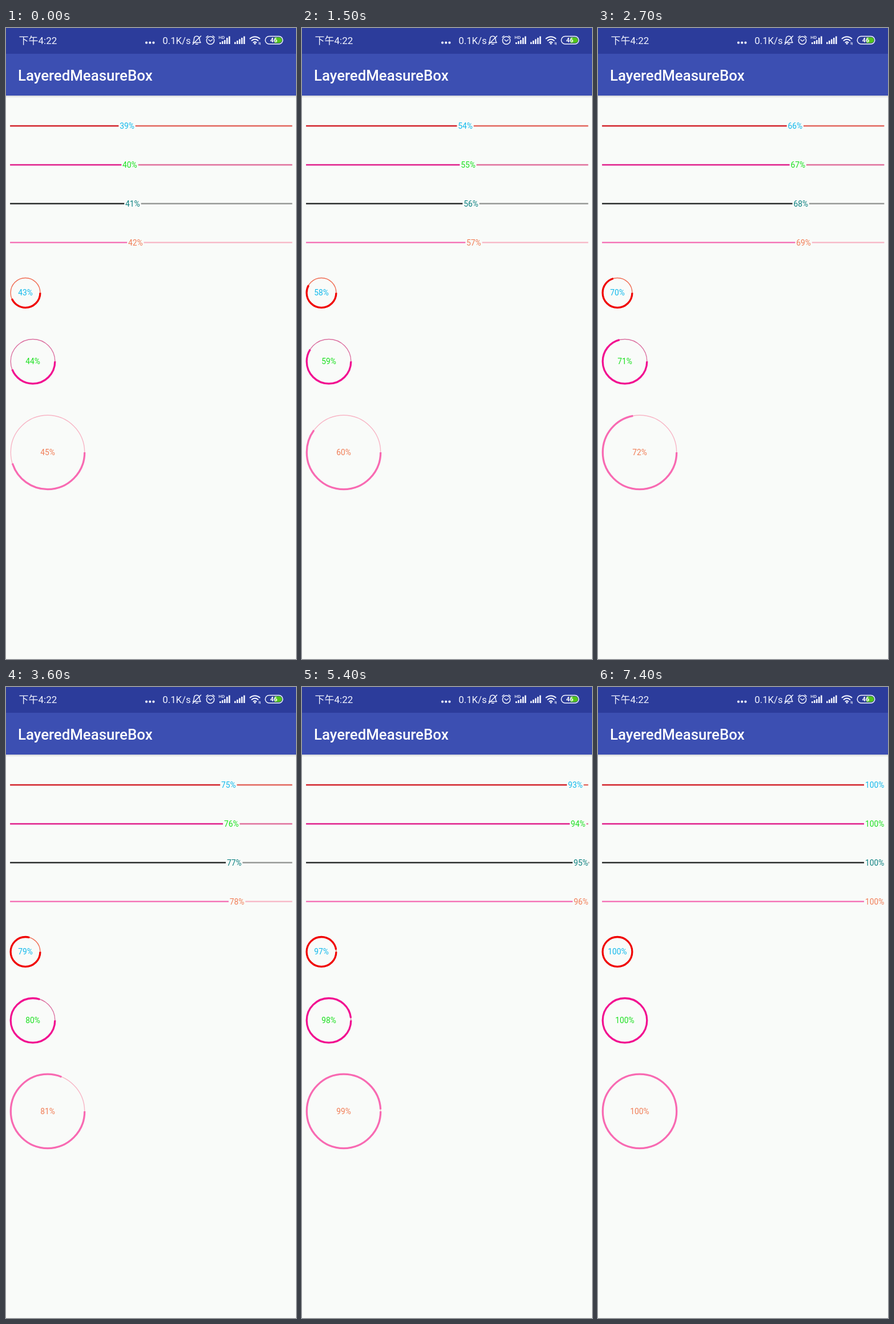
Write an HTML page that moves like this. It is 508 px wide and 1102 px high and loops after 7.7 s.

```html
<!DOCTYPE html>
<html lang="en">
<head>
<meta charset="utf-8">
<title>Progress bars</title>
<style>
html, body { margin: 0; width: 100%; height: 100%; overflow: hidden; background: #f9fbf9; }
svg { display: block; width: 508px; height: 1102px; font-family: Roboto, "Noto Sans CJK SC", "Noto Sans CJK", sans-serif; }
.num { font-size: 13.8px; text-anchor: middle; }
.icon { fill: none; stroke: #f2f4ff; stroke-width: 1.5; stroke-linecap: round; stroke-linejoin: round; }
</style>
</head>
<body>
<svg id="stage" viewBox="0 0 508 1102">
  <defs>
    <linearGradient id="shade" x2="0" y2="1">
      <stop stop-color="#d2d4d6"/>
      <stop offset="1" stop-color="#f9fbf9"/>
    </linearGradient>
    <path id="signal" d="M0 28v-3.5h2.6v3.5zM4 28v-6h2.6v6zM8 28v-8.5h2.6v8.5zM12 28v-11h2.6v11zM16 28v-13.5h2.6v13.5z"/>
  </defs>
  <rect width="508" height="1102" fill="#f9fbf9"/>
  <rect y="118" width="508" height="4" fill="url(#shade)"/>
  <rect width="508" height="45.5" fill="#2c3c9b"/>
  <rect y="45" width="508" height="73" fill="#3c4fb2"/>
  <text x="21" y="91.5" font-size="25.8" font-weight="500" fill="#fff">LayeredMeasureBox</text>

  <g fill="#f2f4ff">
    <text x="22.5" y="28" font-size="17">下午4:22</text>
    <circle cx="246" cy="25.7" r="2.1"/><circle cx="252.2" cy="25.7" r="2.1"/><circle cx="258.4" cy="25.7" r="2.1"/>
    <text x="274.3" y="28" font-size="16.8">0.1K/s</text>
    <text x="372.3" y="18.7" font-size="8" font-weight="500">HD</text>
    <path d="M374 28v-3h2.6v3zM378 28v-5h2.6v5zM382 28v-7h2.6v7zM386 28v-11h2.6v11zM390 28v-13.5h2.6v13.5z"/>
    <use href="#signal" x="400"/>
  </g>
  <g class="icon">
    <path d="M327.5 25.5h13.5c-2-2-2-4-2-6 0-3.200-2-5.300-4.800-5.300s-4.800 2.100-4.800 5.300c0 2 0 4-1.900 6zM332.500 28.300h3.500M327 28.500l14.500-14.500"/>
    <circle cx="358" cy="21.800" r="6.700"/>
    <path d="M355 20.500l3 2.500 3.300-2.500M350.800 16.300l3-2.600M365.200 16.300l-3-2.600"/>
    <path stroke-width="2" d="M427.500 18.500a12.500 12.500 0 0 1 17 0M430.500 22a8 8 0 0 1 11 0M433.500 25.300a4 4 0 0 1 5 0"/>
    <path stroke-width="1" d="M443.300 25v3.500M445.300 25.500v3.500"/>
  </g>
  <circle cx="436" cy="27.300" r="1.500" fill="#f2f4ff"/>
  <path d="M470 16.300h8.500a5 5 0 0 1 0 10h-8.500z" fill="#52c41a"/>
  <rect x="454.200" y="14.600" width="30.600" height="13.400" rx="6.700" class="icon"/>
  <text x="469" y="25.200" font-size="11" font-weight="700" text-anchor="middle" fill="#fff">46</text>
</svg>
<script>
const LOOP = 7700, STEP = 100, FIRST = 39;
const LEFT = 7.06, RIGHT = 501, GAP = 2.35;
const stage = document.getElementById('stage');

function add(tag, attrs) {
  const el = document.createElementNS('http://www.w3.org/2000/svg', tag);
  for (const key in attrs) el.setAttribute(key, attrs[key]);
  return stage.appendChild(el);
}

function label(y, fill) {
  return add('text', { class: 'num', y: y + 4.9, fill });
}

function bar(y, done, rest, ink) {
  const line = stroke => add('path', { stroke, 'stroke-width': 2.4 });
  const a = line(done), b = line(rest), text = label(y, ink);
  return value => {
    const width = value === 100 ? 32.6 : 24.6;
    const x = Math.min(LEFT + (RIGHT - LEFT) * value / 100, RIGHT - width);
    a.setAttribute('d', `M${LEFT} ${y}H${x - GAP}`);
    // Near the end the tail runs backwards until the label is pinned
    const tail = value < 96 ? `M${x + width + GAP} ${y}H${RIGHT + 0.4}` : '';
    b.setAttribute('d', tail);
    text.setAttribute('x', x + width / 2);
    text.textContent = value + '%';
  };
}

function ring(cx, cy, r, done, rest, ink) {
  const circle = (stroke, width) => add('circle', { cx, cy, r, fill: 'none', stroke, 'stroke-width': width });
  circle(rest, 1.4);
  const arc = circle(done, 3.3), text = label(cy, ink), len = 2 * Math.PI * r;
  text.setAttribute('x', cx);
  return value => {
    arc.setAttribute('stroke-dasharray', value === 100 ? 'none' : `${len * value / 100} ${len}`);
    text.textContent = value + '%';
  };
}

const BLUE = '#12b9ec', LIME = '#1ae01e', TEAL = '#0c8080', CORAL = '#f17d56';
const meters = [
  bar(171, '#d2222a', '#e2665c', BLUE),
  bar(239, '#e01e8a', '#e0709c', LIME),
  bar(306.7, '#2c2e2e', '#979997', TEAL),
  bar(374.6, '#f468b2', '#f7b4c4', CORAL),
  ring(34, 462.4, 25.9, '#f00404', '#f06c52', BLUE),
  ring(47, 582.3, 38.8, '#f21090', '#dc70a0', LIME),
  ring(73, 740.9, 64.7, '#f86ab2', '#f8b6c6', CORAL)
];

const start = performance.now();
let shown = -1;

function draw() {
  const tick = Math.floor((performance.now() - start) % LOOP / STEP);
  if (tick !== shown) {
    meters.forEach((set, i) => set(Math.min(100, FIRST + i + tick)));
    shown = tick;
  }
  requestAnimationFrame(draw);
}
draw();
</script>
</body>
</html>
```
